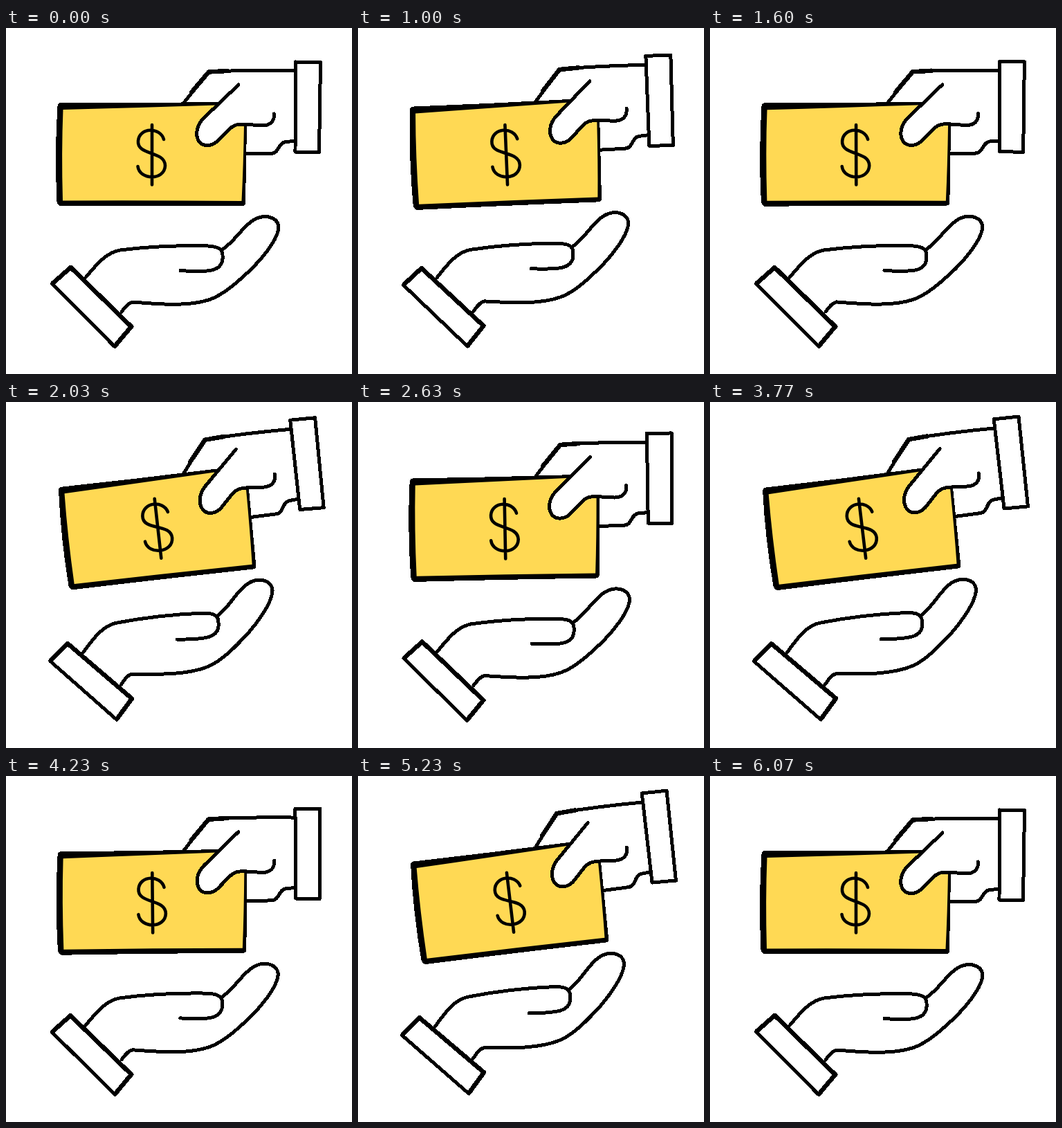
Write an HTML page that moves like this. It is 500x500 px and loops after 6.11 s.

```html
<!DOCTYPE html>
<html lang="en">
<head>
<meta charset="utf-8">
<title>Handing over cash</title>
<style>
  html, body { margin: 0; width: 100%; height: 100%; overflow: hidden; background: #fff; }
  svg { display: block; width: 100vw; height: 100vh; }
  .ink { fill: none; stroke: #000; stroke-width: 5; stroke-linecap: round; stroke-linejoin: round; }
  .ink, .solid { shape-rendering: crispEdges; }
  .cuff { fill: #fff; }
  .bold { stroke-width: 6.5; }
  .sign { stroke-width: 4.6; shape-rendering: auto; }
</style>
</head>
<body>
<svg viewBox="0 0 500 500">
  <g id="giver">
    <!-- back of the hand and cuff -->
    <path class="ink" d="M257 108L293 63Q352 60.500 417 62M346 182L383 181.500C395 181 393 166 404 164.500L417 163.500"/>
    <path class="ink bold" d="M268 93L293 63.500L320 62"/>
    <path class="ink cuff" d="M418.500 49L454.500 49.500L452.500 180L418 179Z"/>
    <!-- banknote -->
    <path class="solid" d="M79 108Q190 108.500 303 107L346 107L348 140L346 252Q346 257 341 257Q205 256.500 79 257.500Q75 257 73.500 251Q70 180 74.500 113Q75 108 79 108Z"/>
    <path fill="#ffd954" d="M82.500 118Q190 115 305 111.500L344 111L344 140Q343 200 340.500 250Q210 249 82 249.500Q80 180 82.500 118Z"/>
    <path class="ink sign" d="M211 140V226.500M228 161C223 143 193 143 191 163C189 185 230 177 230 199C229 221 193 220 190.500 200"/>
    <!-- thumb in front of the note -->
    <path fill="#fff" d="M336 82L286 130C275 141 273 155 279 164C285 172 297 171 305 164L323 146C329 140 335 138.500 350 139.500L356 100Z"/>
    <path class="ink" d="M336 82L286 130C275 141 273 155 279 164C285 172 297 171 305 164L323 146C329 140 335 138 350 139.500L370 141C383 141 388 134 387.500 124"/>
  </g>
  <g id="taker">
    <path class="ink" d="M115.500 360C132 340 146 324 165 321C205 316 255 314 292 315C304 316 313 318 313 328C314.500 343 306 350 290 351C277 352 265 351.500 252 350.500"/>
    <path class="ink" d="M313 320C333 306 342 286 359.500 276.500C378 267 397 276 393.500 292C390 309 370 333 355 348C338 364 315 385.500 294 392.500C265 402.500 225 399.500 183 396C176 397.500 172 404 167 410"/>
    <path class="ink cuff" d="M66.500 369.500L93.500 345.500L182 431.500L157 460.500Z"/>
    <path class="ink bold" d="M68 368.500L93.500 346L181 431.500L157.500 459.500"/>
  </g>
</svg>
<script>
const LOOP = 6110, CYCLE = LOOP / 4, DELAY = 10, SWING = 700;
const giver = document.getElementById('giver');
const taker = document.getElementById('taker');

const bezier = (a, b, u) => 3 * (1 - u) * (1 - u) * u * a + 3 * (1 - u) * u * u * b + u ** 3;

// Slow start, long soft landing: cubic-bezier(.4, 0, .2, 1)
function ease(x) {
  if (x <= 0) return 0;
  if (x >= 1) return 1;
  let lo = 0, hi = 1;
  for (let i = 0; i < 24; i++) {
    const mid = (lo + hi) / 2;
    if (bezier(.4, .2, mid) < x) lo = mid; else hi = mid;
  }
  return bezier(0, 1, lo);
}

// Up, back down, then a short rest
function lift(t) {
  const p = (t % CYCLE - DELAY) / SWING;
  return p < 1 ? ease(p) : 1 - ease(p - 1);
}

function draw(now) {
  const v = lift(now % LOOP);
  giver.setAttribute('transform', `rotate(${-6.8 * v} 211 107)`);
  taker.setAttribute('transform', `rotate(${-4 * v} 137 416)`);
}

const start = performance.now();
function tick() {
  draw(performance.now() - start);
  requestAnimationFrame(tick);
}
tick();
</script>
</body>
</html>
```
